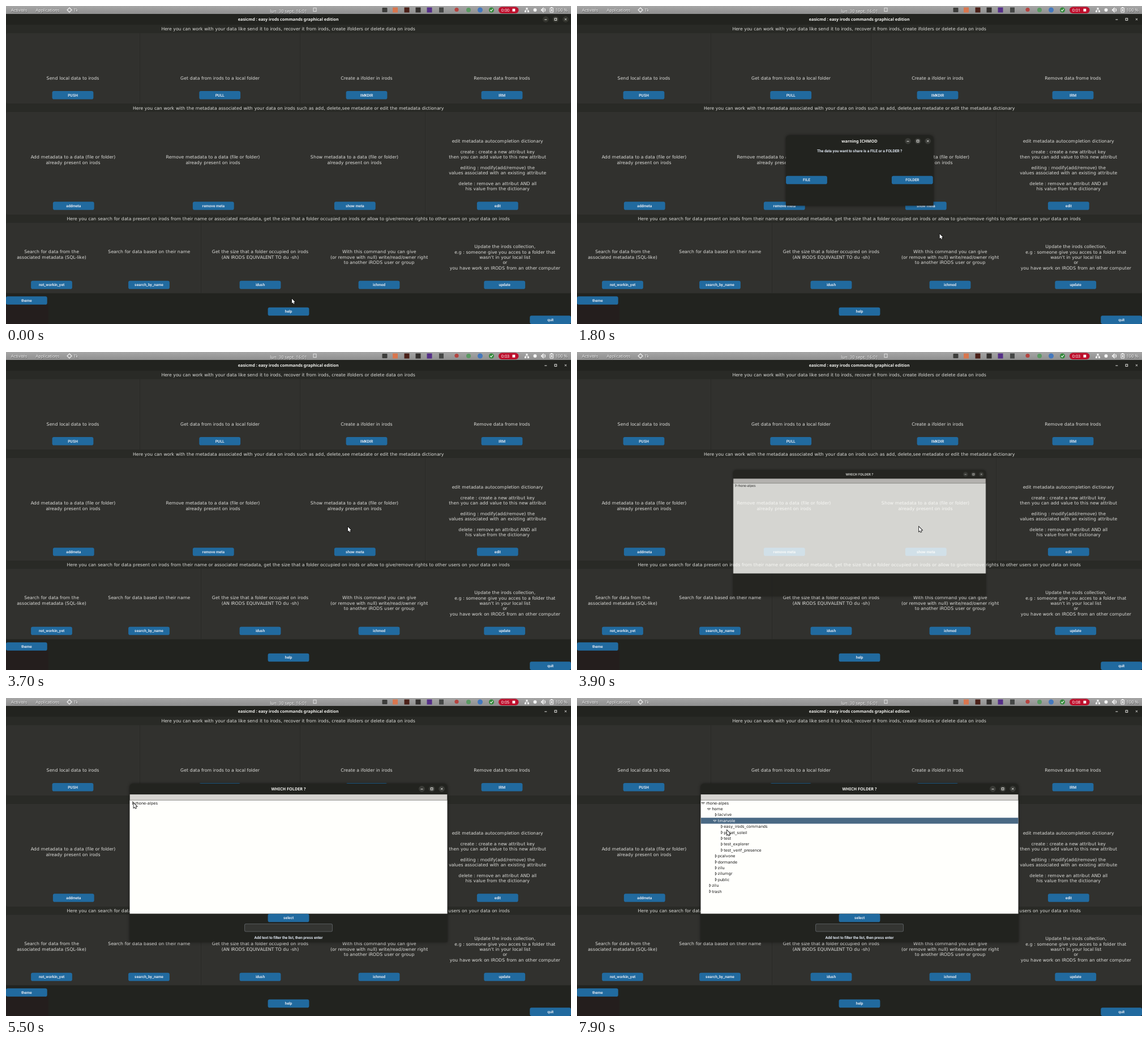
Write an HTML page with a canvas that moves like this. It is 998 px wide and 561 px high and loops after 8 s.

```html
<!DOCTYPE html>
<html lang="en">
<head>
<meta charset="utf-8">
<title>easicmd</title>
<style>
html, body { margin: 0; width: 998px; height: 561px; overflow: hidden; background: #22231f; }
canvas { display: block; }
</style>
</head>
<body>
<canvas id="stage" width="998" height="561"></canvas>
<script>
const LOOP = 8000, STEP = 100;
const SCALE = 998 / 1920;
const DARK = '#22231f', PANEL = '#31312e', BLUE = '#216a9f', HOVER = '#194569';
// font sizes in desktop pixels
const LABEL = '15px "DejaVu Sans", sans-serif';
const BOLD = 'bold 13px Roboto, sans-serif';
const TREE = '13px "DejaVu Sans", sans-serif';
const TITLE = 'bold 14px "Noto Sans", sans-serif';
const BAR = '14px "Noto Sans", sans-serif';
const CLOCK = '14.8px "Noto Sans", sans-serif';
const WHOLE_PIXEL = [LABEL, BOLD, TREE]; // Tk rounds each letter's advance

const screen2d = document.getElementById('stage').getContext('2d');
const layer = Object.assign(document.createElement('canvas'), { width: 998, height: 561 });
const layer2d = layer.getContext('2d');
screen2d.textRendering = layer2d.textRendering = 'geometricPrecision';
let ctx = screen2d;

function rect(x, y, w, h, color, r = 0) {
  ctx.fillStyle = color;
  ctx.beginPath();
  ctx.roundRect(x, y, w, h, r);
  ctx.fill();
}
function dot(x, y, r, color) {
  rect(x - r, y - r, 2 * r, 2 * r, color, r);
}
function line(color, width, ...points) {
  ctx.strokeStyle = color;
  ctx.lineWidth = width;
  ctx.beginPath();
  for (const [x, y] of points) ctx.lineTo(x, y);
  ctx.stroke();
}

const advances = {};
function advance(char, font) {
  return advances[font + char] ??= Math.round(ctx.measureText(char).width);
}
// y is the middle of the capitals
function text(str, x, y, font = LABEL, color = '#dededb', align = 'center') {
  const parts = WHOLE_PIXEL.includes(font) ? [...str] : [str];
  ctx.save();
  ctx.font = font;
  ctx.fillStyle = color;
  ctx.translate(x, y + parseFloat(font.match(/[\d.]+/)[0]) * 0.365 * SCALE);
  ctx.scale(SCALE, SCALE);
  const widths = parts.map(p => parts.length > 1 ? advance(p, font) : ctx.measureText(p).width);
  const total = widths.reduce((a, b) => a + b, 0);
  let pen = { left: 0, center: -total / 2, right: -total }[align];
  parts.forEach((part, i) => {
    ctx.fillText(part, pen, 0);
    pen += widths[i];
  });
  ctx.restore();
}
function lines(str, x, y) {
  str.split('\n').forEach((row, i) => text(row, x, y + i * 18 * SCALE));
}
function button(str, x, y, hover = false) {
  rect(x - 36.4, y - 7.3, 72.8, 14.6, hover ? HOVER : BLUE, 3.1);
  text(str, x, y, BOLD, '#dce4ee');
}
function controls(x, y, circle) {
  for (let i = 0; i < 3; i++) if (circle) dot(x + i * 17.6, y, 5.4, circle);
  const c = '#e6e6e3', a = x + 17.6, b = x + 35.2;
  line(c, 1, [x - 2, y + 0.5], [x + 2, y + 0.5]);
  ctx.strokeRect(a - 1.8, y - 1.8, 3.6, 3.6);
  line(c, 1, [b - 1.6, y - 1.6], [b + 1.6, y + 1.6]);
  line(c, 1, [b + 1.6, y - 1.6], [b - 1.6, y + 1.6]);
}

function barText(str, x, y, align, font = BAR) {
  text(str, x + 0.5, y + 0.7, font, '#4a4a4a', align);
  text(str, x, y, font, '#f4f4f4', align);
}
function topBar(seconds) {
  const shade = ctx.createLinearGradient(0, 0, 0, 14);
  shade.addColorStop(0, '#a6a6a6');
  shade.addColorStop(1, '#8f8f8f');
  rect(0, 0, 998, 14, shade);
  barText('Activités', 9, 7.5, 'left');
  barText('Applications', 52.5, 7.5, 'left');
  barText('Tk', 119.5, 7.5, 'left');
  line('#f2f2f2', 1.2, [112, 3], [116, 7], [112, 11], [108, 7], [112, 3], [116, 7]);
  barText('lun. 30 sept. 16:01', 499, 9, 'center', CLOCK);
  ctx.strokeStyle = '#d8d8d8';
  ctx.strokeRect(543, 3.5, 5, 6);

  rect(664.5, 3, 9, 8, '#3d3d3b', 1);
  rect(683, 2.5, 9, 9, '#d9764e');
  rect(703.5, 2.5, 9, 9, '#4b2018');
  rect(723.5, 2.5, 9, 9, '#33302e');
  rect(743.5, 2.5, 9, 9, '#552f88');
  rect(765, 2.5, 8, 9, '#454746');
  dot(796, 6.5, 3.6, '#b5433f');
  dot(817, 7, 4, '#5a9a62');
  dot(837.5, 7, 4.5, '#4478bd');
  dot(857.5, 7, 4.5, '#348a3c');
  line('#f4f4f4', 1.2, [855.3, 7], [857, 8.8], [860, 5]);
  rect(870, 1.5, 35.5, 11.5, '#bd0f2c', 5.7);
  text(`0:0${seconds}`, 882, 7.4, BAR, '#fff');
  rect(894.5, 4.8, 4.8, 4.8, '#fff');

  const c = '#f4f4f4';
  rect(918.5, 3, 3, 3, c);
  rect(916, 8, 3, 3, c);
  rect(921, 8, 3, 3, c);
  line(c, 0.8, [917.5, 8], [917.5, 7], [922.5, 7], [922.5, 8]);
  dot(934.5, 7, 3, c);
  rect(945, 5.5, 2, 3, c);
  line(c, 1.5, [947, 6], [948.8, 4], [948.8, 10], [947, 8]);
  ctx.beginPath();
  ctx.arc(949, 7, 3.4, -0.9, 0.9);
  ctx.stroke();
  rect(962.5, 2, 2.5, 2, c);
  line(c, 1, [961, 3.5], [966.5, 3.5], [966.5, 11], [961, 11], [961, 3.5]);
  rect(962.8, 5.5, 2, 3.5, c);
  barText('100 %', 992, 7.5, 'right', CLOCK);
}

const META = ' metadata to a data (file or folder)\nalready present on irods';
// label, label x, first line y, button caption, button x, button y
const CELLS = [
  ['Send local data to irods', 118, 127, 'PUSH', 118, 157.3],
  ['Get data from irods to a local folder', 378, 127, 'PULL', 377.7, 157.3],
  ['Create a ifolder in irods', 637, 127, 'IMKDIR', 637, 157.3],
  ['Remove data frome Irods', 876, 127, 'IRM', 876, 157.3],
  ['Add' + META, 118.5, 266.3, 'addmeta', 119.3, 352.5],
  ['Remove' + META, 365.5, 266.3, 'remove meta', 366.3, 352.5],
  ['Show' + META, 615.5, 266.3, 'show meta', 616.3, 352.5],
  ['edit metadata autocompletion dictionary\n\ncreate : create a new attribut key\n' +
   'then you can add value to this new attribut\n\nediting : modify(add/remove) the\n' +
   'values associated with an existing attribute\n\ndelete : remove an attribut AND all\n' +
   'his value from the dictionary', 868.2, 238.3, 'edit', 868.3, 352.5],
  ['Search for data from the\nassociated metadata (SQL-like)', 80.5, 433.5, 'not_workin_yet', 80.5, 492],
  ['Search for data based on their name', 252.7, 433.5, 'search_by_name', 252.5, 492],
  ['Get the size that a folder occupied on irods\n(AN IRODS EQUIVALENT TO du -sh)',
   449, 433.5, 'idush', 449, 492],
  ['With this command you can give\n(or remove with null) write/read/owner right\nto another iRODS user or group',
   659.2, 433.5, 'ichmod', 659, 492],
  ["Update the irods collection,\ne.g : someone give you acces to a folder that\nwasn't in your local list\n" +
   'or\nyou have work on IRODS from an other computer', 881.3, 424.3, 'update', 880.7, 492],
];

function mainWindow(t) {
  rect(0, 14, 998, 547, DARK);
  rect(0, 33, 998, 474, '#292a26');
  for (const [y, h] of [[48, 124], [187, 181], [382.5, 124]]) rect(0, y, 998, h, PANEL, 3);
  for (const [x, y, h] of [[236, 48, 124], [519, 48, 124], [740, 187, 181], [344, 382, 124]])
    rect(x, y, 1, h, '#2a2a27');
  rect(0, 527, 75, 34, '#241e1d');
  text('easicmd : easy irods commands graphical edition', 498.7, 23.7, TITLE, '#f2f2ef');
  controls(953.3, 23.5, t < 1000 ? '#34352f' : null);
  text('Here you can work with your data like send it to irods, recover it from irods, ' +
    'create ifolders or delete data on irods', 498.7, 40.5);
  text('Here you can work with the metadata associated with your data on irods such as add, ' +
    'delete,see metadate or edit the metadata dictionary', 498.7, 179.7);
  text('Here you can search for data present on irods from their name or associated metadata, ' +
    'get the size that a folder occupied on irods or allow to give/remove rights to other users ' +
    'on your data on irods', 498.7, 375);
  for (const [label, x, y, caption, bx, by] of CELLS) {
    lines(label, x, y);
    button(caption, bx, by, caption === 'ichmod' && t >= 800 && t < 1500);
  }
  button('theme', 36.3, 519.5);
  button('help', 499, 539);
  button('quit', 961.7, 553.6);
}

// Draws a window as one layer, scaled about (px, py) and faded as a whole
function popup(scale, alpha, px, py, draw) {
  ctx = layer2d;
  ctx.clearRect(0, 0, 998, 561);
  draw();
  ctx = screen2d;
  ctx.save();
  ctx.globalAlpha = alpha;
  ctx.translate(px, py);
  ctx.scale(scale, scale);
  ctx.drawImage(layer, -px, -py);
  ctx.restore();
}
function frameBox(x, y, w, h, title, titleY) {
  ctx.shadowColor = 'rgba(0,0,0,.5)';
  ctx.shadowBlur = 5;
  rect(x, y, w, h, DARK, [6, 6, 1, 1]);
  ctx.shadowBlur = 0;
  ctx.shadowColor = 'transparent';
  text(title, 499, titleY, TITLE, '#f2f2ef');
  controls(x + w - 45, titleY - 0.3, '#3a3b37');
}
const easeOutExpo = p => p >= 1 ? 1 : 1 - 2 ** (-10 * p);
const openScale = (t, start) => easeOutExpo((t - start) / 150);

function askDialog(t) {
  if (t < 980 || t >= 3685) return;
  const draw = () => {
    frameBox(369, 228.3, 260.5, 124, 'warning ICHMOD', 238.6);
    text('The data you want to share is a FILE or a FOLDER ?', 499, 255.2, BOLD, '#dce4ee');
    button('FILE', 405.5, 307);
    button('FOLDER', 592.3, 307, t >= 2900);
  };
  if (t < 3560) {
    const s = openScale(t, 980);
    popup(s, s, 499, 352.3, draw);
  } else {
    const p = (t - 3560) / 125, e = p * (2 - p);
    popup(1 - 0.2 * e, 1 - e, 499, 290, draw);
  }
}

// name, depth, time it appears, time it opens
const FOLDERS = [
  ['rhone-alpes', 0, 0, 6500],
  ['home', 1, 6500, 6900],
  ['lacvive', 2, 6900],
  ['tmarvole', 2, 6900, 7600],
  ['easy_irods_commands', 3, 7600],
  ['projet_soleil', 3, 7600],
  ['test', 3, 7600],
  ['test_explorer', 3, 7600],
  ['test_verif_presence', 3, 7600],
  ['pcalvone', 2, 6900],
  ['dormande', 2, 6900],
  ['zilu', 2, 6900],
  ['zilumgr', 2, 6900],
  ['public', 2, 6900],
  ['zilu', 1, 6500],
  ['trash', 1, 6500],
];
function tree(t) {
  FOLDERS.filter(f => t >= f[2]).forEach(([name, depth, , opens], i) => {
    const y = 185.2 + i * 20 * SCALE, x = 228 + depth * 20 * SCALE;
    const selected = name === 'tmarvole' && t >= 7500;
    const ink = selected ? '#fff' : '#111';
    if (selected) rect(219, y - 5.1, 560.5, 20 * SCALE, '#4a6984');
    if (t >= opens) line(ink, 0.7, [x - 8, y - 0.7], [x - 2.8, y - 0.7], [x - 5.4, y + 2], [x - 8, y - 0.7]);
    else line(ink, 0.7, [x - 4.4, y - 2.6], [x - 1.6, y], [x - 4.4, y + 2.6], [x - 4.4, y - 2.6]);
    text(name, x, y, TREE, ink, 'left');
  });
}
function folderWindow(t) {
  if (t < 3866) return;
  const s = openScale(t, 3865.7);
  popup(s, s, 499, 430.5, () => {
    frameBox(218.5, 151, 561, 279.5, 'WHICH FOLDER ?', 160.6);
    rect(218.5, 170, 561, 10.5, '#8c8a88');
    rect(219, 170.3, 560, 9.5, '#d6d4d1');
    rect(218.5, 180.4, 561, 200.2, '#fffffc');
    tree(t);
    if (t >= 4100) {
      button('select', 499, 388);
      rect(421, 398, 156, 14.5, '#565a5c', 3);
      rect(422, 399, 154, 12.5, '#343532', 2);
      text('Add text to filter the list, then press enter', 499, 422.2, BOLD, '#dce4ee');
    } else if (t >= 4000) {
      rect(489, 383, 19.5, 10, BLUE);
      rect(424, 399, 150, 12, '#353632');
    }
  });
}

// time, x, y
const PATH = [
  [0, 505, 516], [300, 505, 516], [900, 678, 491], [1300, 678, 491], [2200, 614, 338],
  [2700, 606, 317], [3000, 604.5, 309.5], [3400, 604, 308], [4400, 604, 308], [5400, 225.5, 185],
  [6500, 225.5, 185], [6800, 234, 194], [6900, 234, 194], [7200, 265, 214], [7500, 265, 214], [7900, 265, 233],
];
function cursor(t) {
  const i = Math.max(1, PATH.findIndex(k => k[0] >= t));
  const [t0, x0, y0] = PATH[i - 1], [t1, x1, y1] = PATH[i];
  const p = (t - t0) / (t1 - t0), e = p * p * (3 - 2 * p);
  const x = x0 + (x1 - x0) * e, y = y0 + (y1 - y0) * e;
  ctx.beginPath();
  for (const [dx, dy] of [[0, 0], [0, 8], [1.9, 6.4], [3.1, 9.2], [4.4, 8.6], [3.2, 5.9], [5.6, 5.7]])
    ctx.lineTo(x + dx, y + dy + 0.5);
  ctx.closePath();
  ctx.lineWidth = 1.6;
  ctx.strokeStyle = '#111';
  ctx.stroke();
  ctx.fillStyle = '#fff';
  ctx.fill();
}

const TICKS = [1000, 2000, 3000, 4100, 5100, 6500, 7000, 7900];
function render(t) {
  topBar(TICKS.filter(tick => t >= tick).length);
  mainWindow(t);
  askDialog(t);
  folderWindow(t);
  cursor(t);
}

let start, shown;
function loop(now) {
  start ??= now;
  const t = Math.floor(((now - start) % LOOP) / STEP) * STEP;
  if (t !== shown) render(shown = t);
  requestAnimationFrame(loop);
}
requestAnimationFrame(loop);
</script>
</body>
</html>
```
